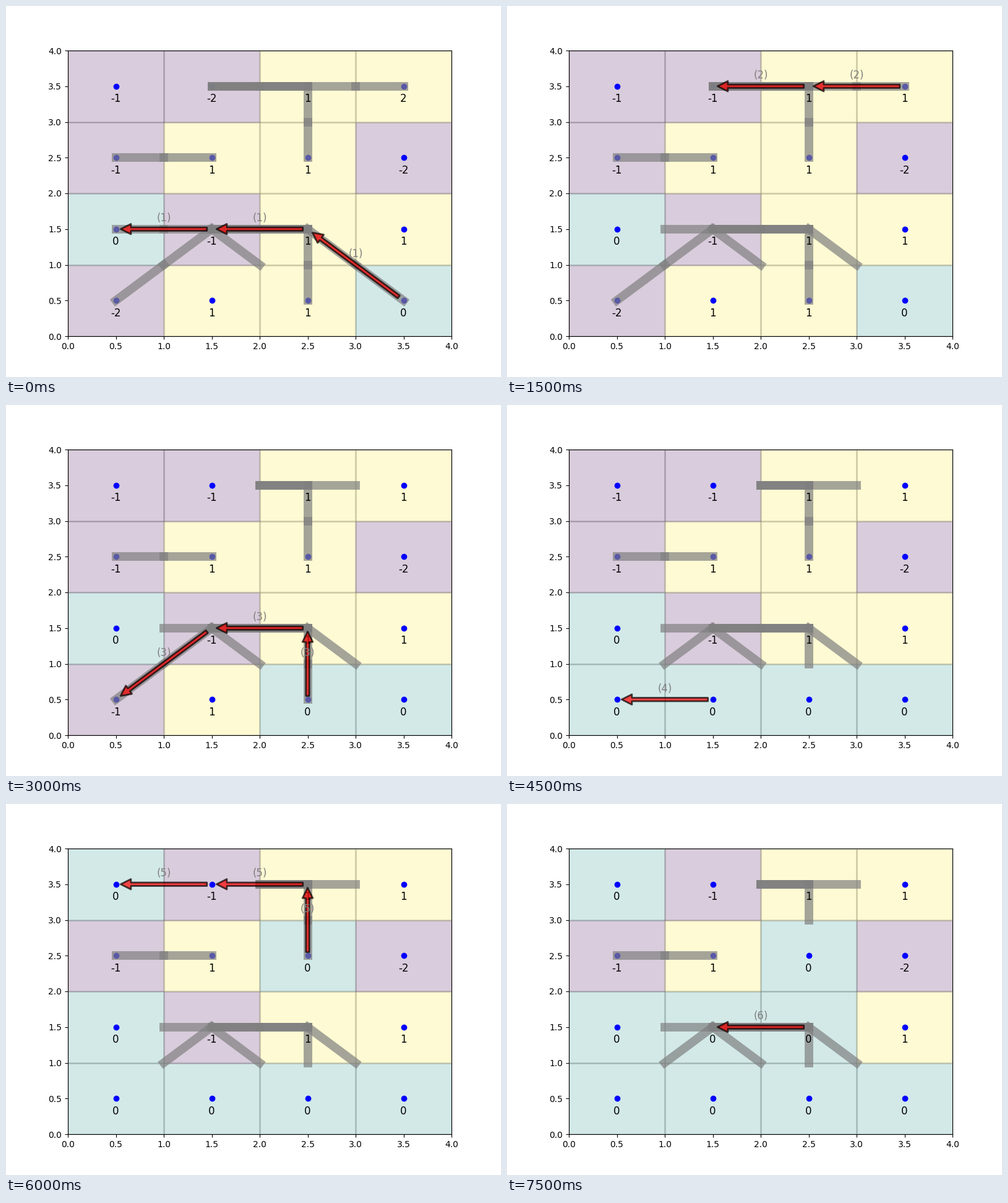
Write a matplotlib script that moves like this. It is 800 px wide and 600 px high and loops after 8000 ms.

```python
import numpy as np
import matplotlib.pyplot as plt
from matplotlib.animation import FuncAnimation

STEP_FRAMES = 3
FRAMES = 16
INTERVAL = 500

# Cell charges after the first move, bottom row first; cells are (column, row).
START = np.array([[-2, 1, 1, 0],
                  [0, -1, 1, 1],
                  [-1, 1, 1, -2],
                  [-1, -2, 1, 2]])

# One unit travels along each path, one path per step.
PATHS = [
    [(3, 0), (2, 1), (1, 1), (0, 1)],
    [(3, 3), (2, 3), (1, 3)],
    [(2, 0), (2, 1), (1, 1), (0, 0)],
    [(1, 0), (0, 0)],
    [(2, 2), (2, 3), (1, 3), (0, 3)],
    [(2, 1), (1, 1)],
]

# Planned routes give every cell on them a spoke towards each neighbour.
ROUTES = [PATHS[0], PATHS[1], PATHS[2], PATHS[4][:-1], PATHS[5],
          [(2, 3), (1, 3)], [(1, 2), (0, 2)]]
LEFTOVER = [((1, 1), (2, 0))]
LEGS = [leg for route in ROUTES for leg in zip(route, route[1:])]
SPOKES = LEGS + [(b, a) for a, b in LEGS] + LEFTOVER

fig, ax = plt.subplots(figsize=(8, 6), dpi=100)


def center(cell):
    return np.array(cell) + 0.5


def charges(step):
    grid = START.copy()
    for path in PATHS[1:step + 1]:
        (c0, r0), (c1, r1) = path[0], path[-1]
        grid[r0, c0] -= 1
        grid[r1, c1] += 1
    return grid


def draw_cells(grid):
    ax.pcolormesh(np.arange(5), np.arange(5), np.sign(grid), cmap="viridis",
                  vmin=-1, vmax=1, alpha=0.2, edgecolors="gray", linewidth=2)
    for (row, col), value in np.ndenumerate(grid):
        x, y = center((col, row))
        ax.plot(x, y, "bo")
        ax.text(x, y - 0.1, str(value), fontsize=12, ha="center", va="top")


def draw_spokes(step):
    # The two ends of a finished path lose their spokes.
    ended = {cell for path in PATHS[:step] for cell in (path[0], path[-1])}
    for cell, neighbour in SPOKES:
        if cell not in ended:
            a = center(cell)
            mid = (a + center(neighbour)) / 2
            ax.plot(*zip(a, mid), color="gray", linewidth=10, alpha=0.7,
                    solid_capstyle="projecting")


def draw_path(step):
    path = PATHS[step]
    for a, b in zip(map(center, path), map(center, path[1:])):
        ax.annotate("", xy=b, xytext=a,
                    arrowprops=dict(facecolor="red", edgecolor="black", width=4,
                                    headwidth=12, headlength=12, shrink=0.05,
                                    linewidth=2, alpha=0.7))
        x, y = (a + b) / 2
        ax.text(x, y + 0.15, f"({step + 1})", fontsize=12, color="gray",
                ha="center", va="center")


def draw(frame):
    step = frame // STEP_FRAMES
    ax.clear()
    draw_cells(charges(step))
    draw_spokes(step)
    draw_path(step)
    ax.set_xlim(0, 4)
    ax.set_ylim(0, 4)
    return []


anim = FuncAnimation(fig, draw, frames=FRAMES, interval=INTERVAL,
                     init_func=lambda: [], repeat=True, repeat_delay=0)
plt.show()
```
